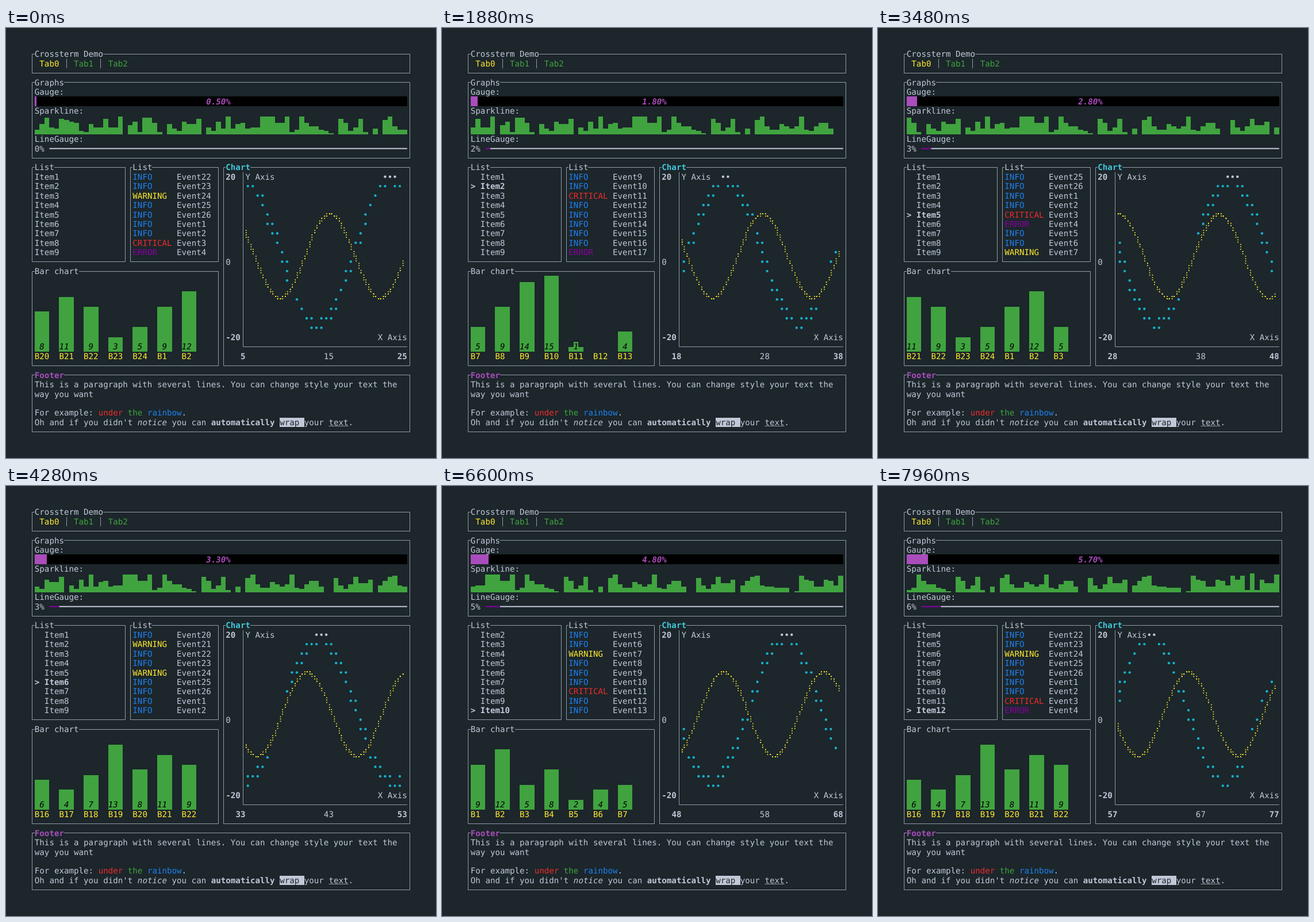
An HTML page that plays this animation: 748 px wide and 748 px high, repeating every 8 s.

```html
<!DOCTYPE html>
<html lang="en">
<head>
<meta charset="utf-8">
<title>Terminal dashboard</title>
<style>
  html, body { margin: 0; width: 100%; height: 100%; overflow: hidden; background: #1c262b; }
  svg { display: block; width: 100vw; height: 100vh; }
  text {
    font: 14.16px "DejaVu Sans Mono", monospace;
    white-space: pre;
    text-rendering: geometricPrecision;
  }
  .b { font-weight: bold; }
  .i { font-style: italic; }
  .block { shape-rendering: crispEdges; }
</style>
</head>
<body>
<svg id="stage" viewBox="0 0 748 748" xmlns="http://www.w3.org/2000/svg">
  <g id="fixed"></g>
  <g id="live"></g>
</svg>
<script>
const LOOP = 8000;

// Terminal grid: cell size and the top left corner of the first cell
const CW = 8.526, CH = 16.42, LEFT = 41.3, TOP = 37.3;
const cellX = col => LEFT + col * CW;
const cellY = row => TOP + row * CH;
const midX = col => cellX(col + 0.5);
const midY = row => cellY(row + 0.5);

const C = {
  bg: '#1c262b', fg: '#c2c8d7', black: '#000000', red: '#ee2b2a', green: '#40a33f',
  yellow: '#ffea2e', blue: '#1e80f0', magenta: '#8800a0', cyan: '#16afca',
  brightMagenta: '#aa4dbc', brightCyan: '#42c7da'
};

const LEVEL_COLOR = { INFO: C.blue, WARNING: C.yellow, ERROR: C.magenta, CRITICAL: C.red };
const LEVELS = { 3: 'CRITICAL', 4: 'ERROR', 7: 'WARNING', 11: 'CRITICAL', 17: 'ERROR',
  18: 'ERROR', 21: 'WARNING', 24: 'WARNING' };
const EVENT_COUNT = 26;

const BARS = [9, 12, 5, 8, 2, 4, 5, 9, 14, 15, 1, 0, 4, 6, 4, 6, 4, 7, 13, 8, 11, 9, 3, 5];

// Sparkline heights in eighths of a row, from the first tick on
const SIGNAL = [
  4, 9, 14, 6, 5, 13, 12, 11, 10, 3, 2, 9, 6, 6, 13, 6, 6, 15, 0, 8, 11, 2, 14, 14, 10, 2,
  0, 9, 5, 3, 11, 9, 9, 13, 0, 6, 3, 11, 5, 15, 5, 9, 10, 5, 6, 6, 15, 15, 15, 10, 10, 15,
  2, 4, 15, 10, 7, 7, 4, 3, 1, 0, 13, 10, 3, 6, 13, 2, 0, 5, 0, 12, 15, 7, 4, 4, 9, 7,
  5, 7, 15, 4, 3, 7, 10, 10, 5, 0, 0, 12, 6, 3, 7, 13, 8, 8, 11, 0, 6, 10, 13, 14, 6, 5,
  5, 4, 4, 4, 0, 1, 14, 11, 10, 5, 5, 11, 10, 6, 14, 11, 14, 2, 16, 2, 11, 8, 8, 15
];

// Ticks come every 160 ms, a few last only 120 ms
const FIRST_TICK = 5, LAST_TICK = 57;
const SHORT_TICKS = [8, 12, 33, 42, 49, 56];
const SELECT_TIMES = [840, 1440, 2040, 2720, 3280, 3920, 4560, 5200, 5800, 6440, 7080, 7680];

const tickStart = n =>
  40 + 160 * (n - FIRST_TICK - 1) - 40 * SHORT_TICKS.filter(s => s < n).length;

function tickAt(time) {
  let n = FIRST_TICK;
  while (n < LAST_TICK && tickStart(n + 1) <= time) n++;
  return n;
}

const mod = (a, b) => ((a % b) + b) % b;
const range = n => Array.from({ length: n }, (_, i) => i);

const text = (col, row, str, fill = C.fg, cls = '') =>
  `<text x="${cellX(col).toFixed(2)}" y="${(midY(row) + 4.9).toFixed(2)}" fill="${fill}" class="${cls}">${str.replace(/>/g, '&gt;')}</text>`;

const rect = (x, y, w, h, fill, cls = 'block') =>
  `<rect x="${x.toFixed(2)}" y="${y.toFixed(2)}" width="${w.toFixed(2)}" height="${h.toFixed(2)}" fill="${fill}" class="${cls}"/>`;

const snap = v => Math.floor(v) + 0.5;

const path = d =>
  `<path d="${d}" fill="none" stroke="${C.fg}" stroke-opacity=".72"/>`;

function box(c0, r0, c1, r1, title = '', fill = C.fg, cls = '') {
  const x0 = snap(midX(c0)), y0 = snap(midY(r0)), x1 = snap(midX(c1)), y1 = snap(midY(r1));
  return path(`M${x0} ${y0}H${x1}V${y1}H${x0}Z`) +
    rect(cellX(c0 + 1), y0 - 2, title.length * CW, 4, C.bg) +
    text(c0 + 1, r0, title, fill, cls);
}

function drawFixed() {
  const axisX = snap(midX(43)), axisY = snap(midY(31));
  return [
    box(0, 0, 77, 2, 'Crossterm Demo'),
    text(2, 1, 'Tab0', C.yellow), text(9, 1, 'Tab1', C.green), text(16, 1, 'Tab2', C.green),
    ...[7, 14].map(c => path(`M${snap(midX(c))} ${cellY(1)}V${cellY(2)}`)),

    box(0, 3, 77, 11, 'Graphs'),
    text(1, 4, 'Gauge:'), text(1, 6, 'Sparkline:'), text(1, 9, 'LineGauge:'),
    rect(cellX(1), cellY(5), 76 * CW, CH, C.black),

    box(0, 12, 19, 22, 'List'),
    box(20, 12, 38, 22, 'List'),
    box(0, 23, 38, 33, 'Bar chart'),

    box(39, 12, 77, 33, 'Chart', C.brightCyan, 'b'),
    path(`M${axisX} ${cellY(13)}V${axisY}H${cellX(77)}`),
    text(40, 13, '20', C.fg, 'b'), text(40, 22, '0'), text(40, 30, '-20', C.fg, 'b'),
    text(44, 13, 'Y Axis'), text(71, 30, 'X Axis'),

    box(0, 34, 77, 40, 'Footer', C.brightMagenta, 'b'),
    text(1, 35, 'This is a paragraph with several lines. You can change style your text the'),
    text(1, 36, 'way you want'),
    text(1, 38, 'For example:'), text(14, 38, 'under', C.red), text(20, 38, 'the', C.green),
    text(24, 38, 'rainbow', C.blue), text(31, 38, '.'),
    text(1, 39, "Oh and if you didn't"), text(22, 39, 'notice', C.fg, 'i'),
    text(29, 39, 'you can'), text(37, 39, 'automatically', C.fg, 'b'),
    rect(cellX(51), cellY(39), 5 * CW, CH, C.fg), text(51, 39, 'wrap', C.bg),
    text(56, 39, 'your'), text(61, 39, 'text.'),
    path(`M${cellX(61)} ${snap(midY(39) + 7)}h${4 * CW}`)
  ].join('');
}

function gauges(n) {
  const percent = n / 10;
  const cells = Math.round(76 * percent / 100 * 8) / 8;
  const lineCells = Math.floor(73 * percent / 100);
  const rounded = n % 20 === 5 ? Math.floor(percent) : Math.round(percent);
  const lineY = midY(10) - 1;
  return rect(cellX(1), cellY(5), cells * CW, CH, C.brightMagenta) +
    text(36, 5, percent.toFixed(2) + '%', C.brightMagenta, 'b i') +
    text(1, 10, rounded + '%') +
    rect(cellX(4), lineY, lineCells * CW, 2, C.magenta, '') +
    rect(cellX(4 + lineCells), lineY, (73 - lineCells) * CW, 2, C.fg, '');
}

function sparkline(n) {
  return range(76).map(i => {
    const h = SIGNAL[n - FIRST_TICK + i] * CH / 8;
    return rect(cellX(1 + i), cellY(9) - h, CW, h, C.green);
  }).join('');
}

function itemList(selected) {
  const offset = Math.max(0, selected - 9);
  return range(9).map(i => {
    const item = offset + i + 1, on = item === selected;
    const prefix = selected ? (on ? '> ' : '  ') : '';
    return text(1, 13 + i, prefix + 'Item' + item, C.fg, on ? 'b' : '');
  }).join('');
}

function eventList(n) {
  return range(9).map(i => {
    const id = mod(i - n, EVENT_COUNT) + 1, level = LEVELS[id] || 'INFO';
    return text(21, 13 + i, level, LEVEL_COLOR[level]) + text(30, 13 + i, 'Event' + id);
  }).join('');
}

function barChart(n) {
  return range(7).map(i => {
    const id = mod(i - n, BARS.length), value = BARS[id], col = 1 + 5 * i;
    const h = Math.floor(value * 64 / 15) * CH / 8;
    const label = String(value), at = col + Math.floor((3 - label.length) / 2);
    let out = text(col, 32, 'B' + (id + 1), C.yellow);
    if (value) {
      out += rect(cellX(col), cellY(32) - h, 3 * CW, h, C.green) +
        rect(cellX(at), cellY(31), label.length * CW, CH, C.green) +
        text(at, 31, label, C.black, 'i');
    }
    return out;
  }).join('');
}

// Sine samples over 20 units, placed on a grid of w by h points
function samples(start, step, period, scale, w, h) {
  return range(Math.round(20 / step)).map(i => {
    const dx = i * step;
    const y = Math.sin((start + dx) / period) * scale;
    return [Math.floor(dx * (w - 1) / 20 + 1e-9), Math.floor((20 - y) * (h - 1) / 40)];
  });
}

function chart(n) {
  const fine = samples(n, 0.1, 2, 10, 66, 72);
  const coarse = samples(n, 0.2, 3, 18, 33, 18);
  const taken = new Set(fine.map(([x, y]) => (x >> 1) + ',' + (y >> 2)));
  range(6).forEach(c => taken.add(c + ',0'));
  let out = '';
  for (const [c, r] of coarse) {
    const key = c + ',' + r;
    if (taken.has(key)) continue;
    taken.add(key);
    out += `<circle cx="${midX(44 + c).toFixed(2)}" cy="${(midY(13 + r) - 0.3).toFixed(2)}" r="2.2" fill="${r ? C.cyan : C.fg}"/>`;
  }
  for (const [x, y] of fine) {
    const px = cellX(44 + (x >> 1)) + 1.4 + 3.6 * (x & 1);
    const py = midY(13 + (y >> 2)) - 5.4 + 4 * (y & 3);
    out += rect(px - 0.85, py - 0.85, 1.7, 1.7, C.yellow, '');
  }
  const first = String(n);
  return out + text(44 - first.length, 32, first, C.fg, 'b') +
    text(60, 32, String(n + 10)) + text(75, 32, String(n + 20), C.fg, 'b');
}

const live = document.getElementById('live');
document.getElementById('fixed').innerHTML = drawFixed();

let shown = '';
function render(time) {
  const n = tickAt(time);
  const selected = SELECT_TIMES.filter(s => s <= time).length;
  const state = n + '/' + selected;
  if (state === shown) return;
  shown = state;
  live.innerHTML = gauges(n) + sparkline(n) + itemList(selected) + eventList(n) +
    barChart(n) + chart(n);
}

const begin = performance.now();
function loop() {
  render((performance.now() - begin) % LOOP);
  requestAnimationFrame(loop);
}
loop();
</script>
</body>
</html>
```
